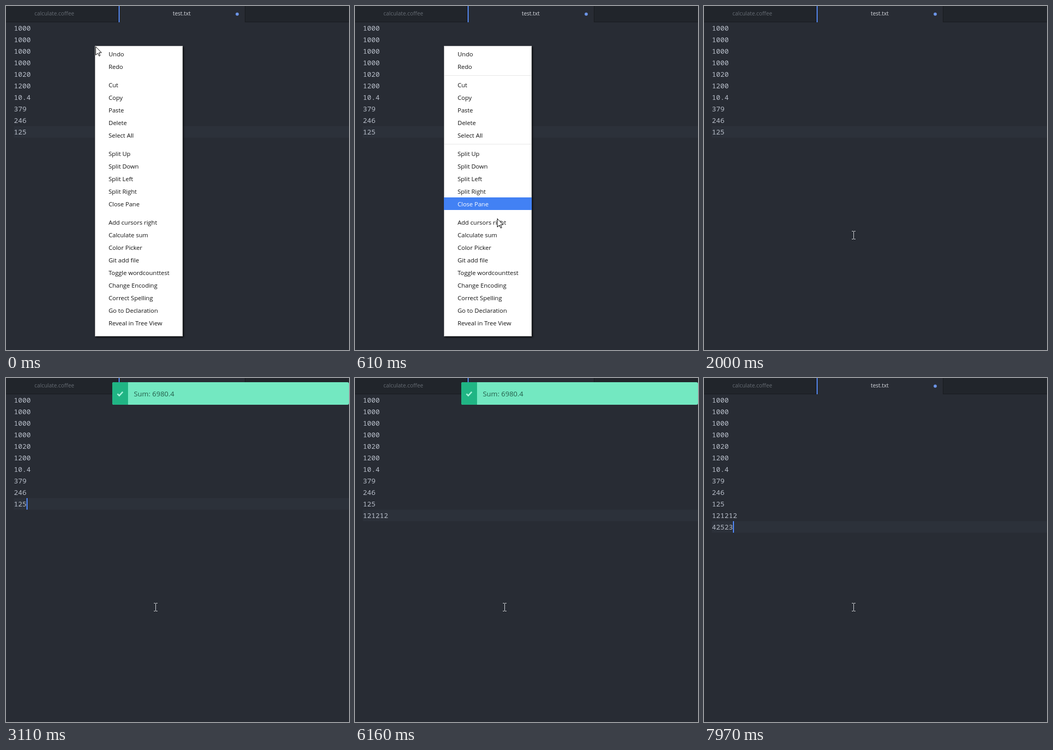
Animation, 652 px wide and 656 px high, one loop 8 s. Source, as an HTML page with a canvas:

```html
<!DOCTYPE html>
<html lang="en">
<head>
<meta charset="utf-8">
<title>Calculate sum</title>
<style>
  html, body { margin: 0; height: 100%; overflow: hidden; background: #282c34; }
  canvas { display: block; }
</style>
</head>
<body>
<canvas id="stage" width="652" height="656"></canvas>
<script>
const ctx = document.getElementById('stage').getContext('2d');
const LOOP = 8000;
const SANS = '"Open Sans", "Noto Sans", sans-serif';
const MONO = '13.333px "Noto Sans Mono", monospace';

const numbers = '1000\n1000\n1000\n1000\n1020\n1200\n10.4\n379\n246\n125';
const keys = [
  [4420, '\n'], [5160, '1'], [5240, '2'], [5420, '1'], [5510, '2'], [5690, '1'], [5790, '2'],
  [6980, '\n'], [7620, '4'], [7700, '2'], [7790, '5'], [7880, '2'], [7970, '3']
];
const caretFlips = [2280, 2650, 3110, 3480, 3860, 4230, 4420, 4970, 5160, 6160, 6620, 7530, 7620];

// Pointer stops: time, x, y
const pointerPath = [
  [0, 170, 77], [80, 176, 98], [160, 195, 165], [230, 216, 243], [310, 234, 310 + 14],
  [380, 244, 345], [440, 254, 366], [530, 263, 387], [610, 270, 405], [690, 275, 417],
  [790, 279, 427], [880, 282, 434], [970, 283, 436]
];

const groups = [
  [92, ['Undo', 'Redo']],
  [151, ['Cut', 'Copy', 'Paste', 'Delete', 'Select All']],
  [282, ['Split Up', 'Split Down', 'Split Left', 'Split Right', 'Close Pane']],
  [413, ['Add cursors right', 'Calculate sum', 'Color Picker', 'Git add file',
    'Toggle wordcounttest', 'Change Encoding', 'Correct Spelling',
    'Go to Declaration', 'Reveal in Tree View']]
];

function rect(color, x, y, w, h) {
  ctx.fillStyle = color;
  ctx.fillRect(x, y, w, h);
}

function text(str, x, y, color, font) {
  ctx.font = font;
  ctx.fillStyle = color;
  ctx.fillText(str, x, y);
}

function drawTabs() {
  rect('#21252b', 0, 0, 652, 31);
  rect('#181a1f', 0, 30, 652, 1);
  rect('#181a1f', 213, 0, 242, 31);
  rect('#282c34', 214, 0, 240, 31);
  rect('#568af2', 214, 0, 2, 31);
  const font = '10.45px ' + SANS;
  text('calculate.coffee', 54, 18, '#666c74', font);
  text('test.txt', 317, 18, '#d7dae0', font);
  ctx.fillStyle = '#6c95e8';
  ctx.beginPath();
  ctx.arc(439.5, 15.5, 3, 0, Math.PI * 2);
  ctx.fill();
}

function drawEditor(t) {
  const typed = keys.filter(k => k[0] <= t).map(k => k[1]).join('');
  const lines = (numbers + typed).split('\n');
  const last = lines.length - 1;
  const top = 31 + 22 * last;
  rect('#2c313a', 15, top, 637, 22);
  lines.forEach((line, i) => text(line, 15, 47 + 22 * i, '#b6bcc7', MONO));
  const caretOn = caretFlips.filter(f => f <= t).length % 2;
  if (caretOn) rect('#528bff', 15 + 8 * lines[last].length, top, 2, 22);
}

function drawMenu(hoverY) {
  ctx.save();
  ctx.shadowColor = 'rgba(0,0,0,.7)';
  ctx.shadowBlur = 3;
  ctx.shadowOffsetX = ctx.shadowOffsetY = 2;
  rect('#c4c4c4', 169, 76, 167, 554);
  ctx.restore();
  rect('#fff', 170, 77, 165, 552);
  for (const [start, items] of groups) {
    // Separators show up once the highlight has passed them
    if (start > 92 && hoverY > start - 19) rect('#e7e7e7', 170, start - 19, 165, 1);
    items.forEach((label, i) => {
      const y = start + 24 * i;
      const hot = hoverY >= y - 13 && hoverY < y + 11;
      if (hot) rect('#4281f4', 169, y - 13, 167, 24);
      text(label, 195, y + 4, hot ? '#fff' : '#111', '11.5px ' + SANS);
    });
  }
}

function drawArrow(x, y) {
  ctx.save();
  ctx.translate(x + .5, y + .5);
  ctx.beginPath();
  for (const [px, py] of [[0, 0], [0, 16], [4, 12.5], [6.5, 18], [8.5, 17], [6.3, 11.5], [11, 11.5]])
    ctx.lineTo(px, py);
  ctx.closePath();
  ctx.fillStyle = '#fff';
  ctx.fill();
  ctx.strokeStyle = '#000';
  ctx.stroke();
  ctx.restore();
}

function drawBeam() {
  const color = '#d4d6d9';
  rect(color, 284, 430, 1, 14);
  for (const y of [429, 444]) {
    rect(color, 281, y, 3, 1);
    rect(color, 285, y, 3, 1);
  }
}

function drawToast(alpha, scaleX, scaleY) {
  ctx.save();
  ctx.globalAlpha = alpha;
  ctx.translate(427, 29.5);
  ctx.scale(scaleX, scaleY);
  ctx.translate(-427, -29.5);
  ctx.beginPath();
  ctx.roundRect(202, 8, 450, 43, 3);
  ctx.clip();
  rect('#73e8c1', 202, 8, 450, 43);
  rect('#20b584', 202, 8, 30, 43);
  ctx.strokeStyle = '#a5f2da';
  ctx.lineWidth = 2.6;
  ctx.beginPath();
  ctx.moveTo(211.8, 30.3);
  ctx.lineTo(215.3, 33.6);
  ctx.lineTo(222, 26.3);
  ctx.stroke();
  text('Sum: 6980.4', 243, 35, '#235c49', '13.4px ' + SANS);
  ctx.restore();
}

function draw(now) {
  const t = now % LOOP;
  rect('#282c34', 0, 0, 652, 656);
  drawTabs();
  drawEditor(t);
  if (t < 2000) {
    const step = pointerPath.filter(p => p[0] <= t).length - 1;
    const [, x, y] = pointerPath[step];
    // The highlight trails the pointer by one stop
    drawMenu(step ? pointerPath[step - 1][2] : 0);
    drawArrow(x, y);
  } else {
    drawBeam();
    if (t >= 2090 && t < 2190) drawToast(.5, 1, .7);
    else if (t >= 2190 && t < 7080) drawToast(1, 1, 1);
    else if (t >= 7080 && t < 7160) drawToast(.98, 1.04, 1.04);
    else if (t >= 7160 && t < 7250) drawToast(.4, .92, .92);
  }
  requestAnimationFrame(draw);
}
requestAnimationFrame(draw);
</script>
</body>
</html>
```
